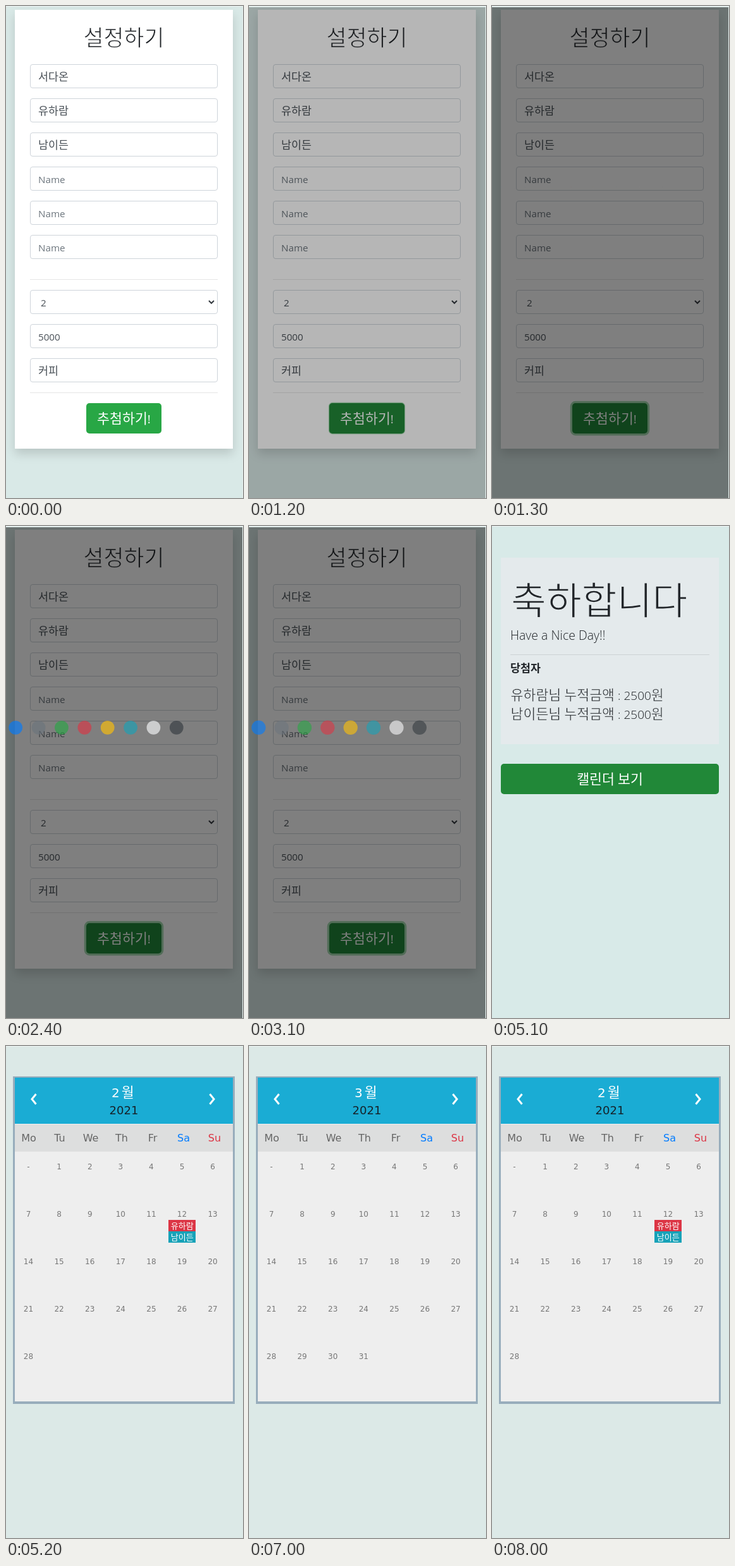
Animation of 375x778 px, one loop 9.9 s. Source, as an HTML page:

```html
<!DOCTYPE html>
<html lang="ko">
<head>
<meta charset="utf-8">
<title>추첨하기</title>
<style>
  html, body { margin: 0; width: 100%; height: 100%; overflow: hidden; background: #d9e9e7; }
  svg { display: block; width: 375px; height: 778px; font-family: "Open Sans", "Noto Sans CJK KR", "Noto Sans CJK", sans-serif; }
  #calendar { font-family: "DejaVu Sans", "Noto Sans CJK KR", "Noto Sans CJK", sans-serif; }
  #form { --paper: #fff; }
  #result { --paper: #e4eaec; }
  .card { filter: drop-shadow(0 8px 8px rgba(0, 0, 0, .15)); }
  .light { font-weight: 300; }
  /* A paper-coloured outline thins the Hangul strokes. */
  .light tspan { stroke: var(--paper); stroke-width: .026em; }
  .bold { font-weight: 700; }
  .mid { text-anchor: middle; }
</style>
</head>
<body>
<svg viewBox="0 0 375 778">
  <g id="form"></g>
  <g id="result"></g>
  <g id="calendar"></g>
  <path d="M0 .5H375" stroke="#eef4f3"/>
</svg>
<script>
const LOOP = 9900, STEP = 100;
const WINNERS = ['유하람', '남이든'];
const NAMES = ['서다온', ...WINNERS];
const INK = '#212529', GREEN = '#28a745', PRESSED = '#218838';
const $ = id => document.getElementById(id);
const clamp = v => Math.min(1, Math.max(0, v));

const rect = (x, y, w, h, fill, extra = '') =>
  `<rect x="${x}" y="${y}" width="${w}" height="${h}" fill="${fill}" ${extra}/>`;

// Hangul is set slightly larger than Latin so that one syllable fills one em.
const label = (x, y, size, text, fill, cls = '', latin = .95) => {
  const runs = text.replace(/[가-힣]+/g, s => `<tspan font-size="${size * 1.085}">${s}</tspan>`);
  return `<text x="${x}" y="${y}" font-size="${size * latin}" fill="${fill}" class="${cls}">${runs}</text>`;
};

const field = (y, text, fill = '#495057', x = 51) =>
  rect(38.5, y + .5, 296, 37, '#fff', 'rx="3.5" stroke="#ced4da"') + label(x, y + 26, 16, text, fill);

const button = (id, x, y, w, text) =>
  rect(x, y, w, 48, GREEN, `id="${id}" rx="5"`) + label(186.5, y + 31.5, 20, text, '#fff', 'mid');

const rule = (x1, x2, y) => `<path d="M${x1} ${y}H${x2}" stroke="#000" stroke-opacity=".1"/>`;

const SPIN = ['#007bff', '#6c757d', '#28a745', '#dc3545', '#ffc107', '#17a2b8', '#f8f9fa', '#343a40'];

$('form').innerHTML =
  rect(0, 0, 375, 778, '#d9e9e7') +
  rect(14, 6, 345, 694, '#fff', 'class="card"') +
  label(186.5, 63, 32, '설정하기', INK, 'mid light') +
  NAMES.map((name, i) => field(92 + 54 * i, name)).join('') +
  [254, 308, 362].map(y => field(y, 'Name', '#6c757d')).join('') +
  rule(38, 335, 432.5) +
  field(449, '2', '#495057', 55) +
  '<path d="M321 466l4 4 4-4" fill="none" stroke="#343a40" stroke-width="2"/>' +
  field(503, '5000') + field(557, '커피') +
  rule(38, 335, 611.5) +
  rect(127, 628, 119, 48, 'none', 'id="ring" rx="5" stroke="#48b461" stroke-opacity=".5"') +
  button('draw', 127, 628, 119, '추첨하기!') +
  rect(0, 2, 374, 776, '#000', 'id="dim"') +
  '<path d="M374.5 0V778" stroke="#e6f1ef"/>' +
  '<g id="spinners">' +
  SPIN.map((c, i) => `<circle cx="${15.2 + 36.37 * i}" cy="318.8" fill="${c}"/>`).join('') + '</g>';

$('result').innerHTML =
  rect(0, 0, 375, 778, '#d8eae8') +
  rect(14, 50, 345, 295, '#e4eaec') +
  label(30, 140, 56, '축하합니다', INK, 'light') +
  label(29, 180, 20, 'Have a Nice Day!!', INK, 'light', .975) +
  rule(29, 344, 203.5) +
  label(29, 230.5, 16, '당첨자', INK, 'bold') +
  WINNERS.map((name, i) => label(29.5, 274.5 + 30 * i, 20, name + '님 누적금액 : 2500원', INK, 'light')).join('') +
  button('open', 14, 376, 345, '캘린더 보기');

const dayColor = d => ({ Sa: '#007bff', Su: '#dc3545' })[d] || '#666';
const dayCell = n =>
  label(35.5 + 48.6 * (n % 7), 195 + 75 * Math.floor(n / 7), 12, n ? String(n) : '-', '#777', 'mid', 1);
const month = (id, n, days, badges = '') =>
  `<g id="${id}"><g letter-spacing="3">${label(167, 81, 20, n + '월', '#fff', '', 1)}</g>` +
  Array.from({ length: days + 1 }, (_, i) => dayCell(i)).join('') + badges + '</g>';
const badge = (name, i) =>
  rect(257, 275 + 18 * i, 43, 18, ['#dc3545', '#17a2b8'][i]) +
  label(278.7, 288.5 + 18 * i, 12, name, '#fff', 'mid');

$('calendar').innerHTML =
  rect(0, 0, 375, 778, '#dce9e7') +
  rect(11, 48, 351, 518, '#98adbc') +
  rect(14, 50, 345, 512, '#eee') +
  rect(14, 50, 345, 73, '#1aacd4') +
  rect(14, 124, 345, 43, '#dddede') +
  '<path d="M47.5 76L41 84l6.5 8M322.5 76l6.5 8-6.5 8" fill="none" stroke="#fff" stroke-width="3"/>' +
  label(186.5, 108, 18, '2021', '#16222a', 'mid', 1) +
  ['Mo', 'Tu', 'We', 'Th', 'Fr', 'Sa', 'Su']
    .map((d, i) => label(36 + 49 * i, 151, 16, d, dayColor(d), 'mid', 1)).join('') +
  month('february', 2, 28, WINNERS.map(badge).join('')) +
  month('march', 3, 31);

const show = (id, on) => $(id).setAttribute('display', on ? 'inline' : 'none');
const press = (id, on) => $(id).setAttribute('fill', on ? PRESSED : GREEN);

// Times in ms: each button is pressed shortly before its page gives way.
const TAP = 1100, RESULT = 3200, OPEN_TAP = 5100, CALENDAR = 5200, MARCH = 7000, BACK = 8000;
const FADE = 137, SLIDE = 274, PULSE = 686;
const BACKDROP = 1122, MODAL = BACKDROP + FADE - 11;

function render(t) {
  show('form', t < RESULT);
  show('result', t >= RESULT && t < CALENDAR);
  show('calendar', t >= CALENDAR);
  const inMarch = t >= MARCH && t < BACK;
  show('february', !inMarch);
  show('march', inMarch);

  press('draw', t >= TAP);
  press('open', t >= OPEN_TAP);
  $('ring').setAttribute('stroke-width', 6.4 * clamp((t - TAP - 50) / FADE));
  $('dim').setAttribute('opacity', .5 * clamp((t - BACKDROP) / FADE));

  // The spinner row opens after the backdrop; dots grow while fading in and out.
  const since = Math.max(0, t - MODAL);
  const phase = since / PULSE % 1;
  const row = $('spinners');
  row.setAttribute('transform', `translate(0 ${-50 * (1 - clamp(since / SLIDE)) ** 2})`);
  row.setAttribute('opacity', clamp(since / FADE - .3));
  for (const dot of row.children) {
    dot.setAttribute('r', 16 * phase);
    dot.setAttribute('opacity', 1 - Math.abs(2 * phase - 1));
  }
}

function tick() {
  render(Math.floor(performance.now() % LOOP / STEP) * STEP);
  requestAnimationFrame(tick);
}
tick();
</script>
</body>
</html>
```
